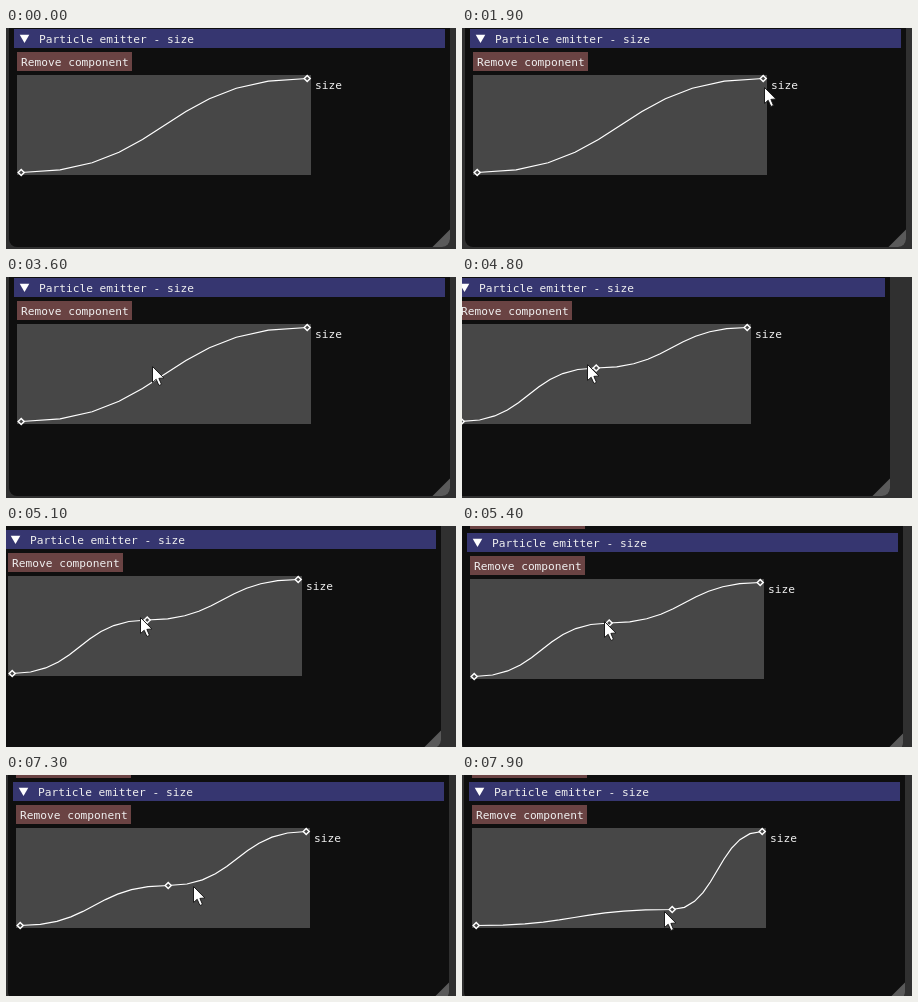
These frames come from a looping animation (450 px wide and 221 px high, 8 s). An HTML page with a canvas:

```html
<!DOCTYPE html>
<html lang="en">
<head>
<meta charset="utf-8">
<title>Curve editor</title>
<style>
  html, body { margin: 0; width: 100%; height: 100%; overflow: hidden; background: #303030; }
  canvas { display: block; }
</style>
</head>
<body>
<canvas id="stage" width="450" height="221"></canvas>
<script>
const ctx = document.getElementById('stage').getContext('2d');
const LOOP = 8000, STEP = 100;
const START = { x: 15.2, y: 144.5 }, END = { x: 301.2, y: 50.5 };

const clamp = (v, lo, hi) => Math.min(hi, Math.max(lo, v));
const ease = p => (1 - Math.cos(Math.PI * p)) / 2;
const move = (from, to, x, y) => ({ from, to, x, y });

// Each move eases from wherever the last one ended; between moves things rest.
function follow({ x, y, moves }, t) {
  for (const m of moves) {
    const p = ease(clamp((t - m.from) / (m.to - m.from), 0, 1));
    x += (m.x - x) * p;
    y += (m.y - y) * p;
  }
  return { x: Math.round(x), y: Math.round(y) };
}

const pointerPath = {
  x: 193, y: 63,
  moves: [
    move(900, 1600, 303, 48),
    move(1700, 2100, 303, 72),
    move(2200, 2600, 305, 157),
    move(2600, 3200, 307, 23),
    move(3200, 3600, 147, 90),
    move(4700, 4800, 126, 88),
    move(4800, 5400, 143, 96),
    move(5400, 5600, 145, 96),
    move(6400, 6700, 131, 94),
    move(6700, 7000, 124, 108),
    move(7000, 7500, 222, 114),
    move(7500, 7900, 203, 137)
  ]
};
const panelPath = {
  x: 0, y: 0,
  moves: [
    move(4700, 4800, -16, 0),
    move(4800, 5400, -3, 6),
    move(5400, 5600, -1, 6)
  ]
};

// Dragged nodes trail the pointer by one step.
function curveNodes(t, panel) {
  const pointer = follow(pointerPath, t - STEP);
  const end = { ...END };
  if (t >= 2000 && t <= 3200) end.y = clamp(pointer.y, END.y, START.y);
  if (t < 4100) return [START, end];
  const mid = t < 6500
    ? { x: 150.2, y: 91 }
    : { x: pointer.x + 4.2 - panel.x, y: pointer.y + 0.5 - panel.y };
  return [START, mid, end];
}

function rect(color, x, y, w, h) {
  ctx.fillStyle = color;
  ctx.fillRect(x, y, w, h);
}

function label(text, x, y) {
  ctx.fillStyle = '#f0f0f0';
  ctx.fillText(text, x, y);
}

function polygon(points, fill, stroke, width = 1) {
  ctx.beginPath();
  points.forEach(([x, y]) => ctx.lineTo(x, y));
  ctx.closePath();
  ctx.fillStyle = fill;
  ctx.fill();
  if (stroke) {
    ctx.strokeStyle = stroke;
    ctx.lineWidth = width;
    ctx.stroke();
  }
}

function button(y) {
  rect('#6a4343', 11, y, 115, 19);
  label('Remove component', 15, y + 14);
}

// Bezier spans with horizontal handles half a span long, in ten straight pieces.
function drawCurve(nodes) {
  ctx.beginPath();
  ctx.moveTo(nodes[0].x, nodes[0].y);
  for (let n = 1; n < nodes.length; n++) {
    const a = nodes[n - 1], b = nodes[n];
    for (let i = 1; i <= 10; i++) {
      const s = i / 10;
      const fx = 1.5 * (1 - s) * s + s ** 3;
      const fy = s * s * (3 - 2 * s);
      ctx.lineTo(a.x + (b.x - a.x) * fx, a.y + (b.y - a.y) * fy);
    }
  }
  ctx.strokeStyle = '#fff';
  ctx.lineWidth = 1.2;
  ctx.stroke();
  for (const { x, y } of nodes) {
    polygon([[x - 3, y], [x, y - 3], [x + 3, y], [x, y + 3]], '#474747', '#fff', 1.5);
  }
}

function drawPanel(nodes) {
  ctx.beginPath();
  ctx.roundRect(3, -20, 441, 239, 8);
  ctx.fillStyle = '#0f0f0f';
  ctx.fill();
  ctx.save();
  ctx.clip();
  polygon([[426.5, 219], [444, 201.5], [444, 219]], '#5a5a5a');
  ctx.restore();

  button(-22);
  rect('#363670', 8, 1, 431, 19);
  polygon([[13.7, 6.7], [23.3, 6.7], [18.5, 15]], '#fff');
  label('Particle emitter - size', 33, 15);
  button(24);
  rect('#474747', 11, 47, 294, 100);
  label('size', 309, 61);
  drawCurve(nodes);
}

function drawCursor({ x, y }) {
  ctx.save();
  ctx.translate(x - 0.5, y - 0.5);
  polygon([[0, 0], [0, 16], [3.7, 12.8], [6.4, 19], [9, 17.9], [6.4, 11.9], [11.4, 11.5]],
    '#fff', '#1c1c1c');
  ctx.restore();
}

function draw(now) {
  const t = Math.floor((now % LOOP) / STEP) * STEP;
  const panel = follow(panelPath, t);
  rect('#303030', 0, 0, 450, 221);
  ctx.font = '11.2px "DejaVu Sans Mono", monospace';
  ctx.save();
  ctx.translate(panel.x, panel.y);
  drawPanel(curveNodes(t, panel));
  ctx.restore();
  if (t >= 900) drawCursor(follow(pointerPath, t));
}

const begin = performance.now();
function tick() {
  draw(performance.now() - begin);
  requestAnimationFrame(tick);
}
tick();
</script>
</body>
</html>
```
